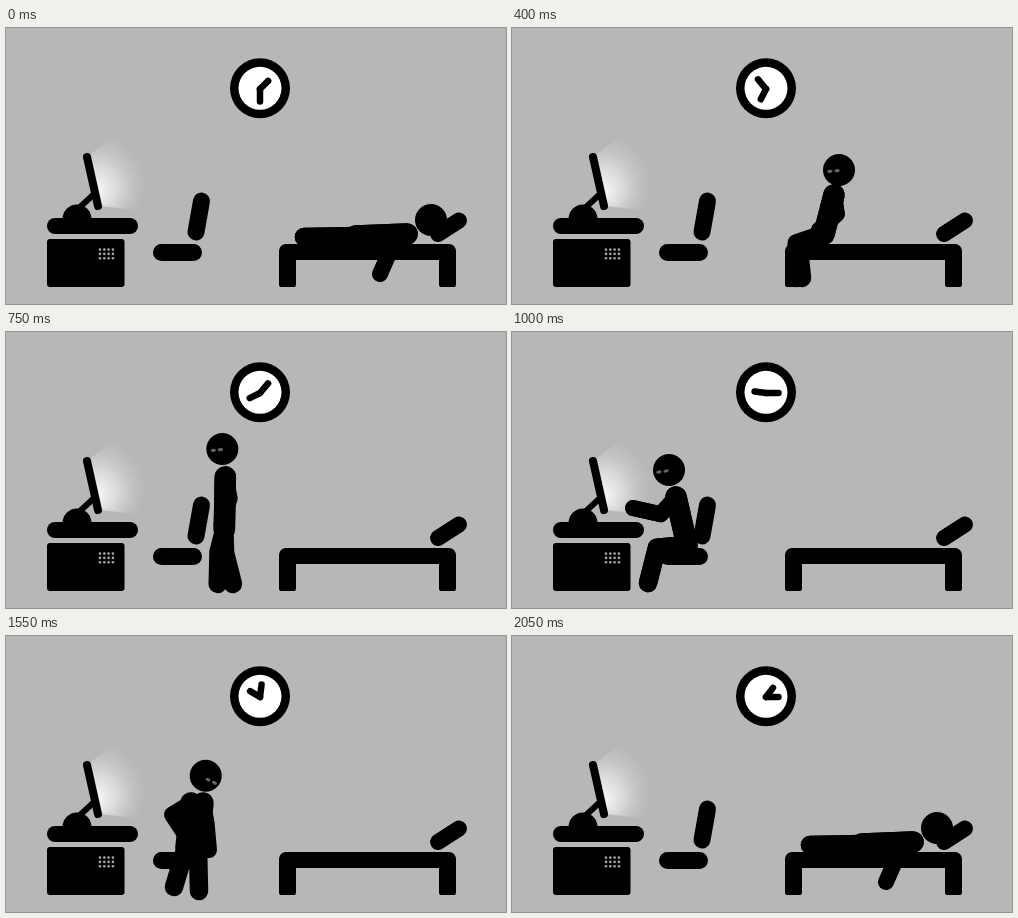
Recreate the animation shown at these times as an HTML page with a canvas. Size 500 by 276 pixels, loop 2.1 s.

```html
<!DOCTYPE html>
<html lang="en">
<head>
<meta charset="utf-8">
<title>Bed, desk, bed</title>
<style>
html, body { margin: 0; width: 100%; height: 100%; overflow: hidden; background: #b7b7b7; }
canvas { display: block; width: 500px; height: 276px; filter: blur(.35px); }
</style>
</head>
<body>
<canvas id="stage" width="500" height="276"></canvas>
<script>
const ctx = document.getElementById('stage').getContext('2d');
const LOOP = 2100, STEP = 50;

// A limb is its end point and the sideways bend of its joint. The second limb copies the first if left out.
// look is where the face points; turn spreads hips and shoulders when seen from the front.
const makePose = (head, shoulder, hip, legs, arms, look, turn = 0) => ({
  head, shoulder, hip, look, turn: [turn],
  legA: legs[0], legB: legs[1] || legs[0],
  armA: arms[0], armB: arms[1] || arms[0]
});

const lying = makePose([425, 192], [401, 206], [350, 208],
  [[298, 209, 0]], [[374, 246, 5], [350, 208, 0]], [0, 0]);

const crawling = makePose([422, 162], [401, 180], [360, 188],
  [[300, 209, -10]], [[388, 212, 14], [386, 213, 18]], [2, 3.5]);

const bedside = makePose([327, 142], [322, 167], [312, 206],
  [[284, 250, 18], [290, 250, 18]], [[307, 202, -10]], [-5.5, 1]);

const seated = lift => makePose([157, 138], [164, 165], [175, 213],
  [[136, 251, 19]], [[121, 176 + lift, -13], [121, 176 - lift, -13]], [-6.5, 1.5]);

const rising = makePose([199.7, 139.7], [191, 167], [186, 211],
  [[168, 251, 0], [193, 255, 0]], [[180, 200, 17], [203, 214, -1]], [5.5, 5.5], 6);

const climbing = makePose([365, 172], [339, 187], [294, 190],
  [[267, 251, 0], [345, 208, 11]], [[377, 208.5, 10]], [4.5, 5]);

function walking(x, dir, stride) {
  const swing = stride / 2;
  return makePose([x + dir * 3, 117], [x, 145], [x - 1, 197],
    [[x + stride, 252, -3 * dir], [x - stride, 252, -3 * dir]],
    [[x + swing, 193, 6 * dir], [x - swing + dir * 5, 189, 2 * dir]], [dir * 5.5, 1]);
}

const steps = (count, make) => Array.from({ length: count + 1 }, (_, i) => make(i / count, i));

const walk = (t0, t1, x0, x1) => steps(6, k =>
  [lerp(t0, t1, k), walking(lerp(x0, x1, k), Math.sign(x1 - x0), 4.5 + 14 * Math.sin(k * Math.PI * 2))]);

const timeline = [
  [0, lying], [50, lying], [250, crawling], [400, bedside],
  ...walk(550, 850, 286, 186),
  ...steps(8, (k, i) => [1000 + 400 * k, seated(i % 2 * 2)]),
  [1550, rising],
  ...walk(1600, 1730, 218, 276),
  [1800, climbing], [1950, lying], [LOOP, lying]
];

// loop time, hour of the day
const hours = [[0, 1.5], [250, 6.58], [550, 7.2], [1000, 9.25], [1550, 22.02],
  [1800, 25.5], [2050, 25.25], [LOOP, 25.5]];

function lerp(a, b, k) { return a + (b - a) * k; }

function span(keys, t) {
  let i = 0;
  while (i < keys.length - 2 && keys[i + 1][0] <= t) i++;
  const [t0, a] = keys[i], [t1, b] = keys[i + 1];
  return [a, b, (t - t0) / (t1 - t0)];
}

function poseAt(t) {
  const [a, b, k] = span(timeline, t), out = {};
  for (const part in a) out[part] = a[part].map((v, i) => lerp(v, b[part][i], k));
  return out;
}

function line(pts, width) {
  ctx.lineWidth = width;
  ctx.beginPath();
  for (let i = 0; i < pts.length; i += 2) ctx.lineTo(pts[i], pts[i + 1]);
  ctx.stroke();
}

function disc(x, y, r, color = '#000') {
  ctx.fillStyle = color;
  ctx.beginPath();
  ctx.arc(x, y, r, 0, Math.PI * 2);
  ctx.fill();
}

function box(x, y, w, h, r) {
  ctx.fillStyle = '#000';
  ctx.beginPath();
  ctx.roundRect(x, y, w, h, r);
  ctx.fill();
}

function drawGlow() {
  const g = ctx.createRadialGradient(90, 164, 2, 88, 155, 53);
  g.addColorStop(0, 'rgba(255,255,255,.9)');
  g.addColorStop(.4, 'rgba(240,240,240,.6)');
  g.addColorStop(1, 'rgba(200,200,200,0)');
  ctx.fillStyle = g;
  ctx.beginPath();
  ctx.moveTo(84, 127);
  ctx.lineTo(109, 107);
  ctx.quadraticCurveTo(139, 120, 140, 150);
  ctx.quadraticCurveTo(139, 170, 129, 182);
  ctx.lineTo(94, 178);
  ctx.fill();
}

function drawRoom() {
  ctx.fillStyle = '#b7b7b7';
  ctx.fillRect(0, 0, 500, 276);
  drawGlow();
  // desk
  line([81, 129, 92, 178], 8);
  line([87, 167, 73, 180], 6);
  disc(71, 191, 14.5);
  box(41, 190, 91, 16, 8);
  box(41, 211, 77.5, 48, 3);
  for (let i = 0; i < 12; i++) disc(94 + i % 4 * 4.3, 221.6 + Math.floor(i / 4) * 4.3, 1.3, '#a5a5a5');
  // chair
  box(147, 216, 49, 17, 8.5);
  line([190, 204, 195.5, 173], 17);
  // bed
  box(273, 216, 177, 16, [7, 7, 0, 0]);
  for (const x of [273, 433]) box(x, 222, 17, 37, [0, 0, 2, 2]);
  line([432, 206, 453, 192.5], 16);
}

function hand(turns, length) {
  const a = turns * Math.PI * 2;
  line([254, 61, 254 + Math.sin(a) * length, 61 - Math.cos(a) * length], 6.5);
}

function drawClock(t) {
  const hour = lerp(...span(hours, t));
  disc(254, 60.3, 30);
  disc(254, 60.3, 21.5, '#fff');
  hand(hour / 12, 11.5);
  hand(hour, 12.5);
}

function limb(x, y, [ex, ey, bend], width) {
  const dx = ex - x, dy = ey - y, len = Math.hypot(dx, dy) || 1;
  const jx = x + dx * .43 - dy / len * bend;
  const jy = y + dy * .43 + dx / len * bend;
  line([x, y, jx, jy, ex, ey], width);
}

function drawPerson(p) {
  const [sx, sy] = p.shoulder, [hx, hy] = p.hip, [x, y] = p.head, [gx, gy] = p.look;
  for (const [side, leg, arm] of [[-p.turn[0], p.legA, p.armA], [p.turn[0], p.legB, p.armB]]) {
    limb(hx + side, hy, leg, 18.5);
    line([hx + side, hy, sx + side, sy], 21.5);
    limb(sx + side, sy, arm, 16);
  }
  disc(x, y, 16);
  // eyes fade as the face turns up
  const tilt = gx * gy * .015;
  ctx.fillStyle = `rgba(100,100,100,${Math.min(1, Math.hypot(gx, gy) / 4)})`;
  for (const side of [-3.6, 3.6]) {
    ctx.beginPath();
    ctx.ellipse(x + gx + side * Math.cos(tilt), y + gy + side * Math.sin(tilt), 2.7, 1.6, tilt, 0, Math.PI * 2);
    ctx.fill();
  }
}

function draw(now) {
  const t = Math.floor(now % LOOP / STEP) * STEP;
  ctx.lineCap = ctx.lineJoin = 'round';
  ctx.strokeStyle = '#000';
  drawRoom();
  drawClock(t);
  drawPerson(poseAt(t));
}

const start = performance.now();
function tick() {
  draw(performance.now() - start);
  requestAnimationFrame(tick);
}
tick();
</script>
</body>
</html>
```
